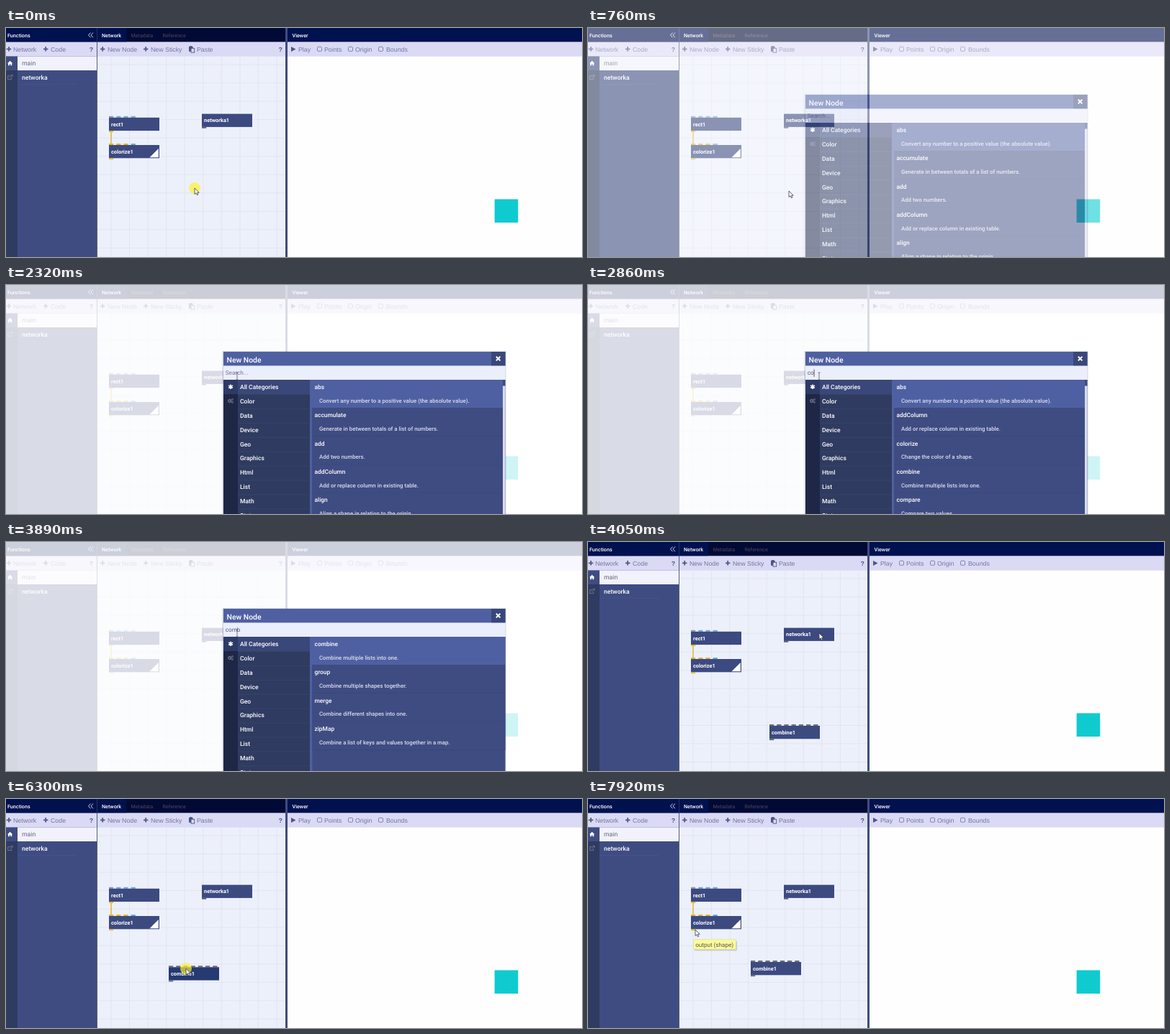
These frames come from a looping animation (800x319 px, 8000 ms). An HTML page:

```html
<!DOCTYPE html>
<html lang="en">
<head>
<meta charset="utf-8">
<title>Node editor</title>
<style>
html, body { margin: 0; width: 100%; height: 100%; overflow: hidden; background: #fefefe; }
svg { display: block; width: 100%; height: 100%; text-rendering: geometricPrecision; }
text { font-family: Roboto, "Noto Sans", sans-serif; font-weight: 500; white-space: pre; }
.tool { font: 8.8px "Liberation Sans", Arial, sans-serif; fill: #73769f; }
</style>
</head>
<body>
<svg id="stage" viewBox="0 0 800 319" xmlns="http://www.w3.org/2000/svg"></svg>
<script>
const LOOP = 8000;
const C = {
  navy: '#00114f', dark: '#000a35', bar: '#dadaf5', panel: '#3f4c82', node: '#3c4a80', held: '#263a72',
  rail: '#2f3b60', accent: '#4f60a2', yellow: '#e0b52c', blue: '#6ba9d6', grey: '#6f6f78', icon: '#4c5685'
};

// Markup helpers
const rect = (x, y, w, h, fill, more = '') =>
  `<rect x="${x}" y="${y}" width="${w}" height="${h}" fill="${fill}" ${more}/>`;
const label = (x, y, size, str, fill = '#fff', weight = 500) =>
  `<text x="${x}" y="${y}" font-size="${size}" fill="${fill}" style="font-weight:${weight}">${str}</text>`;
const tool = (x, str) => `<text class="tool" x="${x}" y="32.7">${str}</text>`;
const line = (d, color, width = 1, more = '') =>
  `<path d="${d}" fill="none" stroke="${color}" stroke-width="${width}" ${more}/>`;
const fill = (d, color) => `<path d="${d}" fill="${color}"/>`;
const plus = x => line(`M${x} 29.3h6.4m-3.2 -3.2v6.4`, C.icon, 1.7);
const help = x => `<text class="tool" x="${x}" y="32.7" style="font-weight:700;fill:${C.icon}">?</text>`;
const box = x => rect(x + 0.5, 26.3, 6, 6, 'none', 'rx="1.2" stroke="#777ba5" stroke-width="0.9"');

function node(x, y, name, ins, out) {
  const ports = ins.map((c, i) => rect(x + i * 10.2, y - 2, 6.2, 2, c)).join('');
  return ports + rect(x, y, 70, 18.3, C.node, 'class="body"') +
    rect(x, y + 18.3, 6.2, 1.8, out) + label(x + 3, y + 11.8, 7.4, name, '#fff', 700);
}

function sidebar() {
  return rect(0, 0, 126, 319, C.panel) + rect(0, 0, 126, 19.6, C.navy) + rect(0, 19.6, 126, 20, C.bar) +
    label(2, 12.6, 7.2, 'Functions') + line('M117.5 6.5l-3 3.4 3 3.4m3.5 -6.8l-3 3.4 3 3.4', '#e4e6f4', 0.9) +
    plus(0.8) + tool(10, 'Network') + plus(52) + tool(62, 'Code') + help(115.7) +
    rect(0, 59, 16, 260, C.rail) + rect(16, 39.6, 110, 19.4, '#f1f2fb') + rect(0, 39.6, 16, 19.4, C.panel) +
    fill('M2 49.3L5.6 45.8 9.2 49.3H8.2V52.3H6.4V50.2H4.8V52.3H3V49.3Z', '#fff') +
    label(22, 52.2, 8.7, 'main', '#62667f', 400) +
    line('M6 66.6H2.6V71.6H7.6V69M5 69.4L8.8 65.6M6.5 65.4H9V68', '#76809f', 0.8) +
    label(22, 71.7, 8.6, 'networka') + rect(16, 78.2, 83, 0.5, '#4a578c');
}

function network() {
  let s = rect(126, 0, 262, 319, '#ecf0fb');
  let grid = '';
  for (let i = 0; i < 11; i++) {
    if (i < 10) grid += `M${146 + i * 25.55} 39.6V319`;
    grid += `M127 ${51 + i * 25.55}H388`;
  }
  s += line(grid, '#e4e2ef', 0.9);
  s += rect(126, 0, 262, 19.6, C.dark) + rect(126, 0, 41, 19.6, C.navy) + rect(126, 19.6, 262, 20, C.bar);
  s += label(133, 12.6, 7.2, 'Network') + label(173.5, 12.6, 7.2, 'Metadata', '#51475a', 400) +
    label(217.5, 12.6, 7.2, 'Reference', '#51475a', 400);
  s += plus(131) + tool(141, 'New Node') + plus(191) + tool(201, 'New Sticky') + tool(265, 'Paste') + help(378.4);
  s += rect(254, 25.8, 5.6, 7, C.icon) + rect(255.4, 25, 2.8, 1.6, C.icon) +
    rect(257, 28.3, 4.7, 5.8, C.bar, `stroke="${C.icon}" stroke-width="0.9"`);
  s += line('M146 144.5V161.5', C.yellow, 1.4);
  s += node(143, 124.8, 'rect1', ['#8f959c', C.blue, C.blue, C.blue], C.yellow);
  s += node(143, 163, 'colorize1', [C.yellow, C.yellow, C.yellow, C.blue], C.yellow);
  s += fill('M199.5 180.2L211.8 168V180.2Z', '#fff');
  s += node(272, 119.6, 'networka1', [], '#59617c');
  return s + rect(125.6, 0, 1.2, 319, C.rail);
}

function viewer() {
  return rect(388, 0, 412, 319, '#fefefe') + rect(391, 0, 409, 19.6, C.navy) + rect(391, 19.6, 409, 20, C.bar) +
    rect(387.8, 0, 3.2, 319, C.panel) + label(397.5, 12.6, 7.2, 'Viewer') +
    fill('M396 26.1L402.6 29.5 396 32.9Z', C.icon) + tool(406, 'Play') +
    box(432) + tool(442, 'Points') + box(475) + tool(485, 'Origin') + box(517) + tool(528, 'Bounds') +
    rect(678.6, 238.5, 32.6, 32.6, '#0fcbd0');
}

function dialog() {
  const names = ['All Categories', 'Color', 'Data', 'Device', 'Geo', 'Graphics', 'Html', 'List', 'Math', 'State'];
  const rows = names.map((n, i) =>
    rect(322, 152 + i * 19.95, 100, 0.6, '#3d496f') + label(325, 144.7 + i * 19.95, 8.5, n)).join('');
  return rect(0, 0, 800, 319, '#fff', 'opacity="0.8"') +
    rect(300.5, 92, 394, 230, '#20284a', 'opacity="0.18" rx="1"') +
    rect(302, 93, 391.5, 19.6, C.accent) + rect(674, 93, 19.5, 19.6, '#394779') +
    label(306.5, 107.8, 10.4, 'New Node') + line('M680.8 99.8l5.6 5.6m0 -5.6l-5.6 5.6', '#fff', 2) +
    rect(302, 112.6, 391.5, 19.6, '#ebeefb') +
    rect(302, 132, 20, 187, '#1f2746') + rect(322, 132, 100, 187, C.rail) + rect(302, 132, 120, 20, '#3a4779') +
    rect(302, 132, 20, 20, '#2d3967') +
    line('M312 138.4V145M309.1 140L314.9 143.4M314.9 140L309.1 143.4', '#fff', 1.5) +
    '<g id="gears" fill="none"><circle cx="310.6" cy="161.5" r="1.8" stroke-width="1.7" stroke-dasharray="1.1 .3"/>' +
    '<circle cx="314.4" cy="159.5" r="1" stroke-width="1"/><circle cx="314.4" cy="163.4" r="1" stroke-width="1"/></g>' +
    rows + '<g id="list"></g><g id="query"></g>' + rect(304.6, 117.5, 0.8, 10.3, '#333', 'id="caret"');
}

const items = [
  ['abs', 'Convert any number to a positive value (the absolute value).'],
  ['accumulate', 'Generate in between totals of a list of numbers.'],
  ['add', 'Add two numbers.'],
  ['addColumn', 'Add or replace column in existing table.'],
  ['align', 'Align a shape in relation to the origin.'],
  ['colorize', 'Change the color of a shape.'],
  ['combine', 'Combine multiple lists into one.'],
  ['compare', 'Compare two values.'],
  ['group', 'Combine multiple shapes together.'],
  ['merge', 'Combine different shapes into one.'],
  ['zipMap', 'Combine a list of keys and values together in a map.']
];

function results(query) {
  const found = items.filter(it => it.join(' ').toLowerCase().includes(query));
  const scrolls = found.length > 5;
  const w = scrolls ? 265 : 268.5;
  let s = rect(422, 132, 271.5, 187, C.panel) + rect(422, 132, 3.4, 187, C.accent);
  found.slice(0, 5).forEach(([name, note], i) => {
    const y = 132 + i * 39.4;
    s += rect(425, y, w, 39.2, i ? C.panel : C.accent) + rect(425, y + 39, w, 0.7, '#364372') +
      label(428.5, y + 12.7, 8.4, name) + label(435, y + 31.5, 7.8, note, '#d9dcec');
  });
  if (scrolls) s += rect(690, 132, 3.5, 187, '#d9dbee') + rect(690, 132, 3.5, 8.5, C.panel);
  return s;
}

const tooltip = rect(147.6, 197.4, 59.5, 14, '#445', 'opacity="0.2" rx="2"') +
  rect(146.5, 195.8, 59, 13.6, '#fbfb9c', 'rx="1.5" stroke="#d5d58a" stroke-width="0.6"') +
  label(149.2, 205.6, 8.1, 'output (shape)', '#55564a', 400);

document.getElementById('stage').innerHTML = viewer() + network() + sidebar() +
  `<g id="combine">${node(0, 0, 'combine1', Array(7).fill(C.grey), '#59617c')}</g>` +
  `<g id="tip">${tooltip}</g><g id="dialog">${dialog()}</g>` +
  '<circle id="click" r="8" fill="#fff22a" opacity="0.68"/>' +
  '<g id="arrow"><path d="M0 0V8.6L2 6.8L3.4 9.8L4.8 9.2L3.5 6.3H6.2Z" fill="#fff" stroke="#333a4a" stroke-width="0.8"/></g>' +
  `<g id="beam">${line('M-1.5 -5H1.5M0 -5V5M-1.5 5H1.5', '#55586a', 0.8)}</g>`;

const $ = id => document.getElementById(id);
const el = Object.fromEntries(['combine', 'tip', 'dialog', 'click', 'arrow', 'beam', 'gears', 'list', 'query', 'caret']
  .map(id => [id, $(id)]));
const body = el.combine.querySelector('.body');

// Progress in n equal jumps, the first at t0 and the last at t1
function jumps(t, t0, t1, n) {
  if (t < t0) return 0;
  if (t >= t1) return 1;
  return (Math.floor((t - t0) / (t1 - t0) * (n - 1)) + 1) / n;
}
const ease = p => p * p * (3 - 2 * p);
const mix = (a, b, p) => a + (b - a) * p;
const within = (t, a, b) => t >= a && t < b;

// Cursor moves: start, end, jumps, x, y
const moves = [
  [300, 610, 5, 279, 227], [1240, 1610, 6, 321, 125], [1770, 1770, 1, 321, 127], [5080, 5680, 9, 276, 258],
  [6780, 6780, 1, 239, 232], [6930, 6930, 1, 196, 222], [7090, 7780, 10, 149, 183], [7920, 7920, 1, 149, 182]
];

function nodeAt(t) {
  const p = jumps(t, 5910, 6450, 8);
  return [mix(252, 226, Math.min(1, p * 1.4)), mix(256, 227, p)];
}

function cursorAt(t) {
  if (within(t, 5910, 6780)) return nodeAt(t).map((v, i) => v + [24, 2][i]);
  let [x, y] = [262, 223];
  for (const [t0, t1, n, tx, ty] of moves) {
    const p = ease(jumps(t, t0, t1, n));
    x = mix(x, tx, p);
    y = mix(y, ty, p);
  }
  return [x, y];
}

const keys = [2710, 2860, 3090, 3340];
const show = (e, on) => e.setAttribute('visibility', on ? 'visible' : 'hidden');
const place = (e, [x, y]) => e.setAttribute('transform', `translate(${x} ${y})`);
let shown = null;

function draw(t) {
  const pos = cursorAt(t);
  const typing = within(t, 1860, 4050);
  place(el.arrow, pos);
  place(el.beam, pos);
  place(el.click, pos);
  show(el.arrow, !typing);
  show(el.beam, typing);
  show(el.click, t < 70 || within(t, 1770, 1860) || within(t, 5680, 6450));

  place(el.combine, nodeAt(t));
  show(el.combine, t >= 4050);
  body.setAttribute('fill', within(t, 5600, 6930) ? C.held : C.node);
  show(el.tip, t >= 7860);

  const open = within(t, 760, 4050);
  el.dialog.style.display = open ? '' : 'none';
  if (!open) return;
  el.dialog.setAttribute('opacity', t < 840 ? 0.5 : 1);
  el.gears.setAttribute('stroke', t < 1400 ? '#4668a8' : '#7a7f90');
  const query = 'comb'.slice(0, keys.filter(k => t >= k).length);
  if (query !== shown) {
    shown = query;
    el.list.innerHTML = results(query);
    el.query.innerHTML = label(304.7, 125.2, 8.2, query || 'Search...', query ? '#555a78' : '#747997', 400);
  }
  const width = query ? el.query.firstChild.getComputedTextLength() : 0;
  el.caret.setAttribute('x', 304.7 + width);
  el.caret.style.display = within(t, 1860, 2320) || within(t, 2710, 3890) ? '' : 'none';
}

const start = performance.now();
function tick() {
  draw((performance.now() - start) % LOOP);
  requestAnimationFrame(tick);
}
tick();
</script>
</body>
</html>
```
